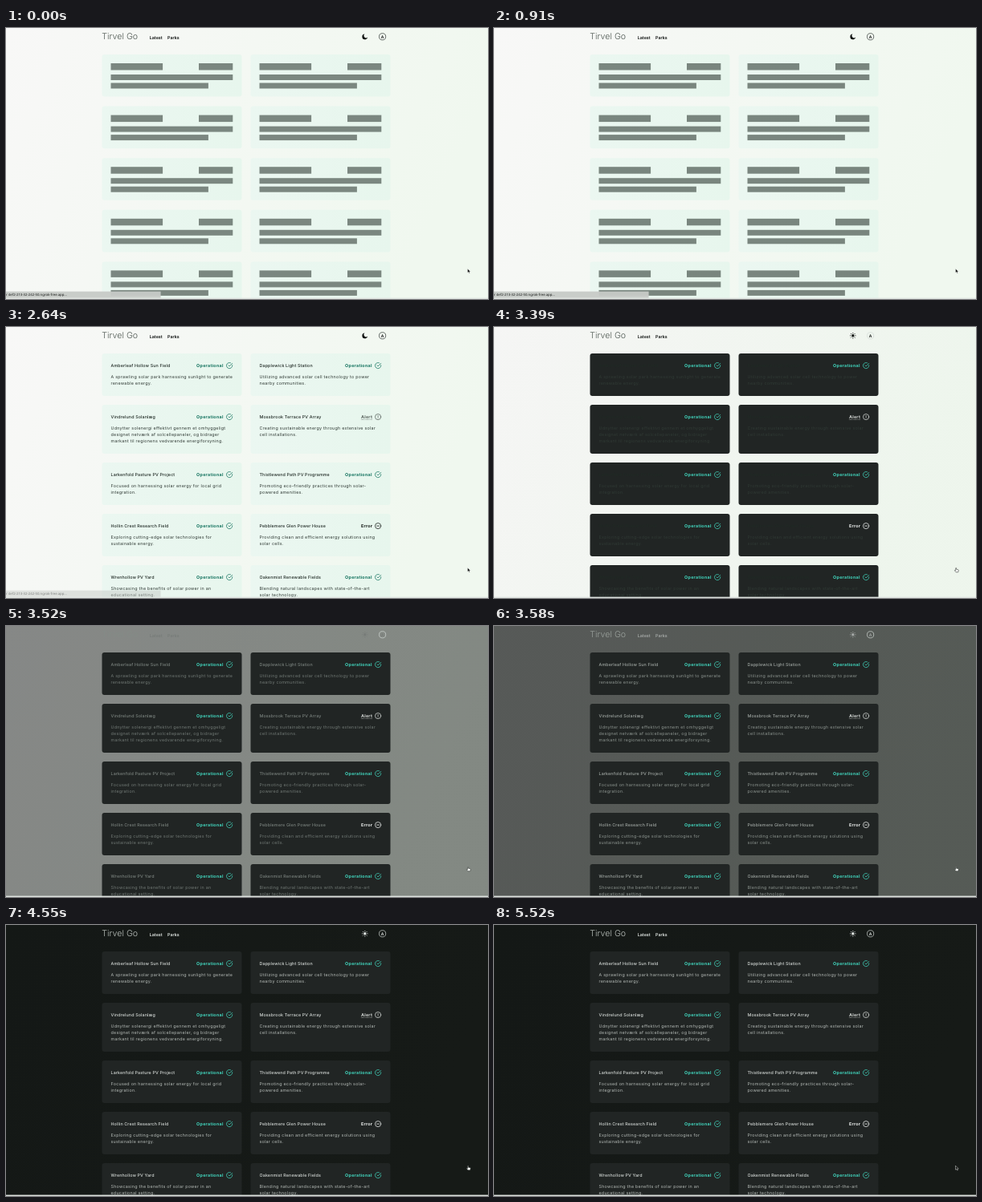
Animation of 600 by 338 pixels, one loop 5550 ms. Source, as an HTML page:

```html
<!DOCTYPE html>
<html lang="en">
<head>
<meta charset="utf-8">
<title>Solar parks dashboard</title>
<style>
  html, body { margin: 0; width: 100%; height: 100%; overflow: hidden; }
  svg { display: block; width: 100vw; height: 100vh; --ok: #14735f; --alert: #59625d; --error: #161b18; --ring: #2c3330; --card: url(#cardLight); }
  svg.dark { --ok: #42d6be; --alert: #d5d9d6; --error: #eef1ef; --ring: #d3dad6; --card: #212524; }
  text { font-family: Inter, sans-serif; font-size: 5.33px; text-rendering: geometricPrecision; white-space: pre; }
  .logo { font-size: 10.67px; font-weight: 300; fill: var(--logo); }
  .nav { font-weight: 600; fill: var(--nav); }
  .title { font-weight: 500; letter-spacing: .025em; fill: var(--title); }
  .body { letter-spacing: .05em; fill: var(--body); }
  .state { font-weight: 700; letter-spacing: .055em; }
  .url { font-family: "Noto Sans", sans-serif; font-size: 4.25px; fill: #181b19; }
  .icon { fill: none; stroke-width: .75; stroke-linecap: round; stroke-linejoin: round; }
  .card { fill: var(--card); }
</style>
</head>
<body>
<svg id="stage" viewBox="0 0 600 338" preserveAspectRatio="none">
  <defs>
    <linearGradient id="bgLight" x2="1" y2=".25">
      <stop stop-color="#f8f8f7"/><stop offset="1" stop-color="#f0f8ef"/>
    </linearGradient>
    <linearGradient id="bgDark" x2="1" y2=".25">
      <stop stop-color="#141816"/><stop offset="1" stop-color="#161a17"/>
    </linearGradient>
    <linearGradient id="cardLight">
      <stop stop-color="#ebf7f1"/><stop offset="1" stop-color="#e7f6ed"/>
    </linearGradient>
  </defs>
  <rect width="600" height="338" fill="url(#bgLight)"/>
  <rect id="night" width="600" height="338" fill="url(#bgDark)"/>

  <text class="logo" x="119.3" y="14">Tirvel Go</text>
  <text class="nav" x="178.8" y="13.9">Latest</text>
  <text class="nav" x="201" y="13.9">Parks</text>
  <path id="moon" d="M446.4 7.6A3.4 3.4 0 1 0 450.1 11.6A2.7 2.7 0 0 1 446.4 7.6Z" fill="#0c0f0d"/>
  <g id="sun" fill="var(--nav)" stroke="var(--nav)" stroke-width=".8" stroke-linecap="round"></g>
  <circle cx="468.6" cy="10.8" r="4.1" fill="none" stroke="var(--ring)" stroke-width=".7"/>
  <text class="nav" x="468.6" y="12.6" text-anchor="middle" style="font-size:5px">A</text>

  <g id="skeleton"></g>
  <g id="content"></g>

  <rect y="336.6" width="600" height="1.4" fill="#dfe4e0"/>
  <g id="status">
    <rect y="328.6" width="192.6" height="8" fill="#c8cbc8" opacity=".95"/>
    <text class="url" x="0" y="334.1">r 4ef2-213-32-242-50.ngrok-free.app...</text>
  </g>

  <path id="arrow" d="M574.5 300.2V305.2L575.7 304.2L576.5 306L577.4 305.6L576.6 303.9H578.2Z"
        fill="#0a0c0b" stroke="#f4f6f4" stroke-width=".45"/>
  <path id="hand" d="M574.7 300.6Q575.2 300 575.6 300.6V302.2L577.9 302.7Q578.4 302.9 578.3 303.5L577.8 305.8H575L573.4 303.8Q573.3 303.1 574 303.2L574.7 303.7Z"
        fill="#f6f8f6" stroke="#222624" stroke-width=".5"/>
</svg>
<script>
const LOOP = 5550, LOADED = 2420, HOVER = 3240, DARK = 3390, LEAVE = 5520;
const COLS = [119.5, 304.5], CARD_W = 174;
const ROWS = [[33, 53], [97, 61], [169, 53], [233, 53], [297, 53]];
const PARKS = [
  ["Amberleaf Hollow Sun Field", "ok", "A sprawling solar park harnessing sunlight to generate|renewable energy."],
  ["Dapplewick Light Station", "ok", "Utilizing advanced solar cell technology to power|nearby communities."],
  ["Vindrelund Solanlæg", "ok", "Udnytter solenergi effektivt gennem et omhyggeligt|designet netværk af solcellepaneler, og bidrager|markant til regionens vedvarende energiforsyning."],
  ["Mossbrook Terrace PV Array", "alert", "Creating sustainable energy through extensive solar|cell installations."],
  ["Larkenfold Pasture PV Project", "ok", "Focused on harnessing solar energy for local grid|integration."],
  ["Thistlewend Path PV Programme", "ok", "Promoting eco-friendly practices through solar-|powered amenities."],
  ["Hollin Crest Research Field", "ok", "Exploring cutting-edge solar technologies for|sustainable energy."],
  ["Pebblemere Glen Power House", "error", "Providing clean and efficient energy solutions using|solar cells."],
  ["Wrenhollow PV Yard", "ok", "Showcasing the benefits of solar power in an|educational setting."],
  ["Oakenmist Renewable Fields", "ok", "Blending natural landscapes with state-of-the-art|solar technology."]
];
const RING = '<circle r="3.6"/>';
const STATES = {
  ok: ["Operational", '<path d="M3.6 -.4V0A3.6 3.6 0 1 1 1.5 -3.3M3.6 -2.7L0 .9L-1.1 -.2"/>'],
  alert: ["Alert", RING + '<path d="M0 -1.6V.2M0 1.6V1.65"/>'],
  error: ["Error", RING + '<path d="M-1.5 0H1.5"/>']
};
const THEME = {
  logo: [[78, 88, 82], [186, 192, 188]],
  nav: [[12, 16, 14], [226, 231, 228]],
  title: [[30, 40, 35], [214, 219, 216]],
  body: [[46, 56, 51], [182, 188, 184]]
};

const $ = id => document.getElementById(id);
const clamp = v => Math.max(0, Math.min(1, v));
const show = (id, on) => $(id).setAttribute("visibility", on ? "visible" : "hidden");
const rect = (x, y, w, h, extra = "") => `<rect x="${x}" y="${y}" width="${w}" height="${h}" ${extra}/>`;
const text = (cls, x, y, str, extra = "") => `<text class="${cls}" x="${x}" y="${y}" ${extra}>${str}</text>`;
const cardBox = (x, y, h) => rect(x, y, CARD_W, h, 'rx="3" class="card"');

function bezier(x1, y1, x2, y2) {
  const at = (a, b, s) => 3 * (1 - s) ** 2 * s * a + 3 * (1 - s) * s * s * b + s ** 3;
  return x => {
    let lo = 0, hi = 1;
    for (let i = 0; i < 24; i++) {
      const mid = (lo + hi) / 2;
      if (at(x1, x2, mid) < x) lo = mid; else hi = mid;
    }
    return at(y1, y2, lo);
  };
}
const ease = bezier(.25, .1, .25, 1);
const pulse = bezier(.4, 0, .6, 1);

function parkCard([name, state, about], i) {
  const x = COLS[i % 2], [y, h] = ROWS[i >> 1];
  const [label, icon] = STATES[state], color = `var(--${state})`;
  const lines = about.split("|").map((line, n) => text("body", x + 11, y + 30.8 + n * 8.1, line));
  const labelX = x + (state === "ok" ? 117.6 : 137.4);
  const dots = state === "alert"
    ? `<path d="M${labelX} ${y + 18.4}h14.2" stroke="${color}" stroke-width=".6" stroke-dasharray=".7 .5"/>` : "";
  return cardBox(x, y, h) + text("title", x + 11, y + 16.9, name) + lines.join("") +
    text("state", labelX, y + 16.9, label, `fill="${color}"`) + dots +
    `<g class="icon" stroke="${color}" transform="translate(${x + 158.6} ${y + 15.1})">${icon}</g>`;
}

function build() {
  let cards = "", bars = "";
  for (let r = 0; r < 5; r++) for (const x of COLS) {
    const y = 33 + r * 64.6;
    cards += cardBox(x, y, 52.6);
    bars += rect(x + 11, y + 11, 64.6, 8.5) + rect(x + 120.5, y + 11, 42.3, 8.5) +
      rect(x + 11, y + 25, 151.8, 7) + rect(x + 11, y + 35.5, 121.4, 7);
  }
  $("skeleton").innerHTML = cards + `<g id="bars" fill="#4e5a53">${bars}</g>`;
  $("content").innerHTML = PARKS.map(parkCard).join("");
  let rays = '<circle cx="446.8" cy="10.8" r="1.7" stroke="none"/>';
  for (let a = 0; a < 360; a += 45)
    rays += `<path d="M446.8 7.9v-.5" transform="rotate(${a} 446.8 10.8)"/>`;
  $("sun").innerHTML = rays;
}

function draw(t) {
  const dark = t >= DARK, loaded = t >= LOADED, hover = t >= HOVER && t < LEAVE;
  const stage = $("stage");
  stage.classList.toggle("dark", dark);
  show("skeleton", !loaded);
  show("content", loaded);
  show("moon", !dark);
  show("sun", dark);
  show("arrow", !hover);
  show("hand", hover);

  // two-second pulse, brightest bars at 450 ms
  const d = Math.abs((t + 1550) % 2000 - 1000) / 1000;
  $("bars").setAttribute("opacity", .5 + .5 * pulse(1 - d));
  $("status").setAttribute("opacity", 1 - clamp((t - 2480) / 340));

  const p = dark ? ease(clamp((t - 3380) / 480)) : 0;
  $("night").setAttribute("opacity", p);
  for (const key in THEME) {
    const [a, b] = THEME[key];
    stage.style.setProperty("--" + key, `rgb(${a.map((v, i) => Math.round(v + (b[i] - v) * p))})`);
  }
}

build();
const start = performance.now();
function tick() {
  draw((performance.now() - start) % LOOP);
  requestAnimationFrame(tick);
}
tick();
</script>
</body>
</html>
```
